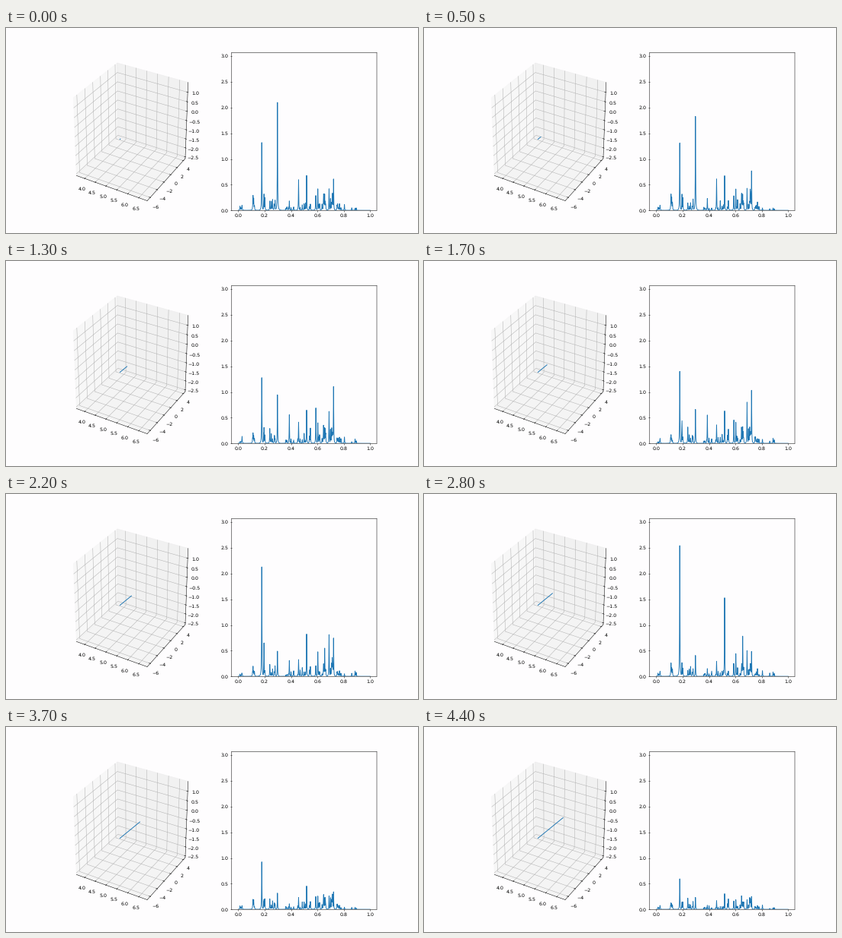
A matplotlib script that plays this animation: 540x270 px, repeating every 5000 ms.

```python
import numpy as np
import matplotlib.pyplot as plt
from matplotlib.animation import FuncAnimation

plt.rcParams.update({
    "font.family": "DejaVu Sans",
    "text.hinting": "none",
    "path.snap": False,
    "axes.facecolor": "#fefdfe",
    "figure.facecolor": "#fefdfe",
})
STEPS, LAST = 50, 44

fig = plt.figure(figsize=(12, 6), dpi=45)

# --- perspective box ---------------------------------------------------
box = fig.add_subplot(121)
box.set(xlim=(-0.0946, 0.0904), ylim=(-0.095, 0.09))
box.axis("off")

DIST = 10
ELEV, AZIM = np.radians([30, -60])
EYE = np.array([np.cos(ELEV) * np.cos(AZIM),
                np.cos(ELEV) * np.sin(AZIM), np.sin(ELEV)])
RIGHT = np.cross([0, 0, 1], EYE)
RIGHT /= np.linalg.norm(RIGHT)
UP = np.cross(EYE, RIGHT)

HALF = 0.5 + 1 / 48           # half edge of the drawn cube
OUT, IN = 0.1 / 12, 0.2 / 12  # tick reach
PAD, DROP = 0.0722, 0.0005    # label distance from the edge


def project(points):
    p = np.atleast_2d(points).astype(float)
    depth = DIST - p @ EYE
    return p @ RIGHT / depth, p @ UP / depth


def line3d(points, color="black", z=3):
    box.plot(*project(points), color=color, lw=0.8, zorder=z, clip_on=False)


def point(axis, value, others):
    return np.insert(np.array(others, float), axis, value)


def draw_pane(axis, side, shade):
    square = [(-1, -1), (1, -1), (1, 1), (-1, 1)]
    x, y = project([point(axis, side, c) * HALF for c in square])
    box.fill(x, y, fc=str(shade), ec=str(shade), lw=1, alpha=0.5,
             zorder=1, clip_on=False)


def draw_axis(axis, lo, hi, ticks, fmt, edge, wall):
    """edge: signs of the other two coordinates; wall: grid path in them."""
    edge = np.array(edge, float)
    line3d([point(axis, s * HALF, edge * HALF) for s in (-1, 1)])
    for t in ticks:
        c = (t - lo) / (hi - lo) - 0.5
        line3d([point(axis, c, np.array(w) * HALF) for w in wall],
               "#b0b0b0", 2)
        line3d([point(axis, c, edge * (HALF + np.array([reach, 0])))
                for reach in (OUT, -IN)])
        x, y = project(point(axis, c, edge * (HALF + PAD)))
        box.text(x[0], y[0] - DROP, fmt.format(t).replace("-", "\u2212"),
                 ha="center", va="top", fontsize=10)


draw_pane(0, -1, 0.95)
draw_pane(1, 1, 0.90)
draw_pane(2, -1, 0.925)

draw_axis(0, 3.668, 6.805, np.arange(4, 6.6, 0.5), "{:.1f}",
          (-1, -1), [(-1, -1), (1, -1), (1, 1)])
draw_axis(1, -6.6, 4.38, range(-6, 5, 2), "{:d}",
          (1, -1), [(1, -1), (-1, -1), (-1, 1)])
draw_axis(2, -2.512, 1.427, np.arange(-2.5, 1.1, 0.5), "{:.1f}",
          (1, 1), [(-1, -1), (-1, 1), (1, 1)])

START, END = np.array([-0.0150, -0.0115]), np.array([0.0170, 0.0125])
path, = box.plot([], [], color="C0", lw=1.5, zorder=5)

# --- spectrum ----------------------------------------------------------
spec = fig.add_subplot(122)
spec.set(xlim=(-0.05, 1.05), ylim=(0, 3.068),
         xticks=np.arange(0, 1.1, 0.2), yticks=np.arange(0, 3.1, 0.5))
trace, = spec.plot([], [], color="C0", lw=1.5)

# position, steady level, surge height, surge centre, surge width
PEAKS = [
    (0.178, 1.32, 1.60, 26.5, 6.5),
    (0.195, 0.32, 0.40, 21, 4),
    (0.297, 0.52, 1.58, 0, 11.6),
    (0.387, 0.18, 0.42, 15, 7),
    (0.457, 0.38, 0.25, 3, 8),
    (0.518, 0.68, 1.00, 28, 5),
    (0.588, 0.22, 0.48, 13, 5),
    (0.603, 0.42, 0.15, 25, 6),
    (0.655, 0.32, 0.55, 27, 6),
    (0.688, 0.42, 0.48, 20, 8),
    (0.722, 0.56, 0.58, 14, 9),
]
# centre, spread, height, count
CLUSTERS = [
    (0.015, 0.015, 0.09, 5), (0.112, 0.012, 0.22, 5),
    (0.185, 0.020, 0.25, 5), (0.260, 0.025, 0.22, 6),
    (0.420, 0.060, 0.14, 9), (0.520, 0.040, 0.20, 7),
    (0.625, 0.040, 0.26, 12), (0.705, 0.015, 0.32, 5),
    (0.810, 0.085, 0.13, 10),
]

rng = np.random.default_rng(4)
freq = np.linspace(0, 1, 1001)
small = [(x + rng.uniform(-s, s), h * rng.uniform(0.25, 1),
          rng.uniform(14, 40), rng.uniform(0, 2 * np.pi))
         for x, s, h, n in CLUSTERS for _ in range(n)]


def spike(x, height, width=0.0014):
    return height / (1 + ((freq - x) / width) ** 2)


def spectrum(t):
    fade = 1 - 0.55 * (t / LAST) ** 2
    y = np.full_like(freq, 0.002)
    for x, level, period, phase in small:
        sway = 0.75 + 0.35 * np.sin(2 * np.pi * t / period + phase)
        y += spike(x, level * sway * (0.4 + 0.6 * fade))
    for x, level, surge, centre, width in PEAKS:
        bump = surge * np.exp(-((t - centre) / width) ** 2)
        y = np.maximum(y, spike(x, level * fade + bump))
    return y


def progress(t):
    u = t / LAST
    return max(0.015, u - 0.06 * np.sin(np.pi * u ** 2))


def update(i):
    t = min(i, LAST)
    tip = START + (END - START) * progress(t)
    path.set_data([START[0], tip[0]], [START[1], tip[1]])
    trace.set_data(freq, spectrum(t))
    return path, trace


anim = FuncAnimation(fig, update, frames=STEPS, interval=100, repeat=True)
plt.show()
```
